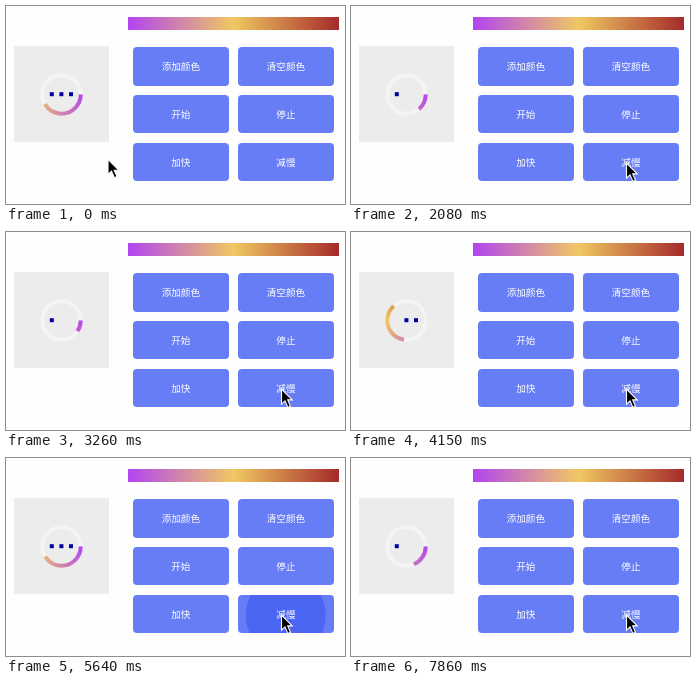
Recreate the animation shown at these times as an HTML page with a canvas. Size 339 by 198 pixels, loop 8000 ms.

```html
<!DOCTYPE html>
<html lang="zh">
<head>
<meta charset="utf-8">
<title>Color ring loader</title>
<style>
  html, body { margin: 0; width: 100%; height: 100%; overflow: hidden; background: #fefefe; }
  #stage { position: relative; width: 339px; height: 198px; overflow: hidden; }
  #stage > * { position: absolute; }
  #bar { left: 122px; top: 11px; width: 210.5px; height: 13px;
    background: linear-gradient(90deg, #b244f0, #f0c862 50%, #a52a2a); }
  #panel { left: 7.5px; top: 40.3px; width: 95.5px; height: 95.7px; background: #ececec; }
  #loader { left: 31px; top: 64px; width: 49px; height: 49px; }
  .button { width: 95.7px; height: 38.4px; border-radius: 4px; overflow: hidden; background: #677df6;
    color: #fff; font: 9.6px/38.4px "Noto Sans CJK SC", "Noto Sans CJK", sans-serif; text-align: center; }
  .button span { position: relative; }
  #ripple { position: absolute; left: 47.5px; top: 20.5px; width: 0; height: 0; border-radius: 50%;
    background: #4b66f2; transform: translate(-50%, -50%); }
  #cursor { left: 0; top: 0; width: 14px; height: 21px; overflow: visible; }
</style>
</head>
<body>
<div id="stage">
  <div id="bar"></div>
  <div id="panel"></div>
  <canvas id="loader"></canvas>
  <svg id="cursor" viewBox="0 0 14 21">
    <path d="M0 0V15.2L3.5 11.9L6.4 18.4L9 17.3L6.2 10.9H10.8Z" fill="#000" stroke="#fff" stroke-width="1.1"/>
  </svg>
</div>
<script>
const LOOP = 8000, STEPS = 54;
const SIZE = 49, CENTER = 24.5, RADIUS = 19.2, WIDTH = 4;
const COLORS = ['#b244f0', '#f0c862', '#a52a2a'];

// [time in ms, value]
const TURNS = [[0, .417], [1190, 1.98], [2410, 3.578], [4740, 4.995], [5640, 5.417],
  [6530, 5.833], [6970, 5.975], [7860, 6.19]];
const CURSOR_X = [[0, 102], [1190, 234.7], [1950, 275.5]];
const CURSOR_Y = [[0, 153.3], [1190, 164.2], [1950, 157]];
const PRESSES = [{ down: 2130, up: 2700 }, { down: 5450, up: 5830 }];

const stage = document.getElementById('stage');
const cursor = document.getElementById('cursor');
const canvas = document.getElementById('loader');
const ctx = canvas.getContext('2d');
const ratio = window.devicePixelRatio || 1;
canvas.width = canvas.height = SIZE * ratio;
ctx.scale(ratio, ratio);

const sweep = ctx.createConicGradient(0, CENTER, CENTER);
COLORS.forEach((color, i) => sweep.addColorStop(i / 2, color));

['添加颜色', '清空颜色', '开始', '停止', '加快', '减慢'].forEach((label, i) => {
  const button = document.createElement('div');
  button.className = 'button';
  button.style.left = 127 + i % 2 * 105.1 + 'px';
  button.style.top = 41.3 + Math.floor(i / 2) * 47.8 + 'px';
  button.innerHTML = (i === 5 ? '<i id="ripple"></i>' : '') + `<span>${label}</span>`;
  stage.insertBefore(button, cursor);
});
const ripple = document.getElementById('ripple');

const clamp = x => Math.min(1, Math.max(0, x));

function valueAt(table, time) {
  const next = table.findIndex(([t]) => t > time);
  if (next < 0) return table[table.length - 1][1];
  const [t0, v0] = table[next - 1], [t1, v1] = table[next];
  return v0 + (v1 - v0) * (time - t0) / (t1 - t0);
}

function strokeArc(from, to, style) {
  ctx.beginPath();
  ctx.arc(CENTER, CENTER, RADIUS, from * 2 * Math.PI, to * 2 * Math.PI);
  ctx.lineWidth = WIDTH;
  ctx.strokeStyle = style;
  ctx.stroke();
}

function drawLoader(turn) {
  ctx.clearRect(0, 0, SIZE, SIZE);
  strokeArc(0, 1, '#f4f4f4');
  // The tail waits for half a turn, then catches up at double speed.
  strokeArc(Math.max(0, 2 * turn - 1), turn, sweep);
  const phase = Math.floor(turn * 5);
  ctx.fillStyle = '#0000a0';
  for (let i = 0; i < 3; i++) {
    if (i <= phase && i >= phase - 2) ctx.fillRect(12.8 + i * 9.6, 22.2, 4, 4);
  }
}

function drawRipple(time) {
  const press = PRESSES.find(({ down, up }) => time >= down && time < up + 300);
  const size = press ? 2 * 56 * clamp((time - press.down) / 250) : 0;
  ripple.style.width = ripple.style.height = size + 'px';
  ripple.style.opacity = press ? 1 - clamp((time - press.up) / 300) : 0;
}

function render(elapsed) {
  const step = Math.min(STEPS - 1, Math.floor((elapsed % LOOP + 6) * STEPS / LOOP));
  const time = step * LOOP / STEPS;
  drawLoader(valueAt(TURNS, time) % 1);
  drawRipple(time);
  cursor.style.transform = `translate(${valueAt(CURSOR_X, time)}px, ${valueAt(CURSOR_Y, time)}px)`;
}

const start = performance.now();
function tick() {
  render(performance.now() - start);
  requestAnimationFrame(tick);
}
tick();
</script>
</body>
</html>
```
